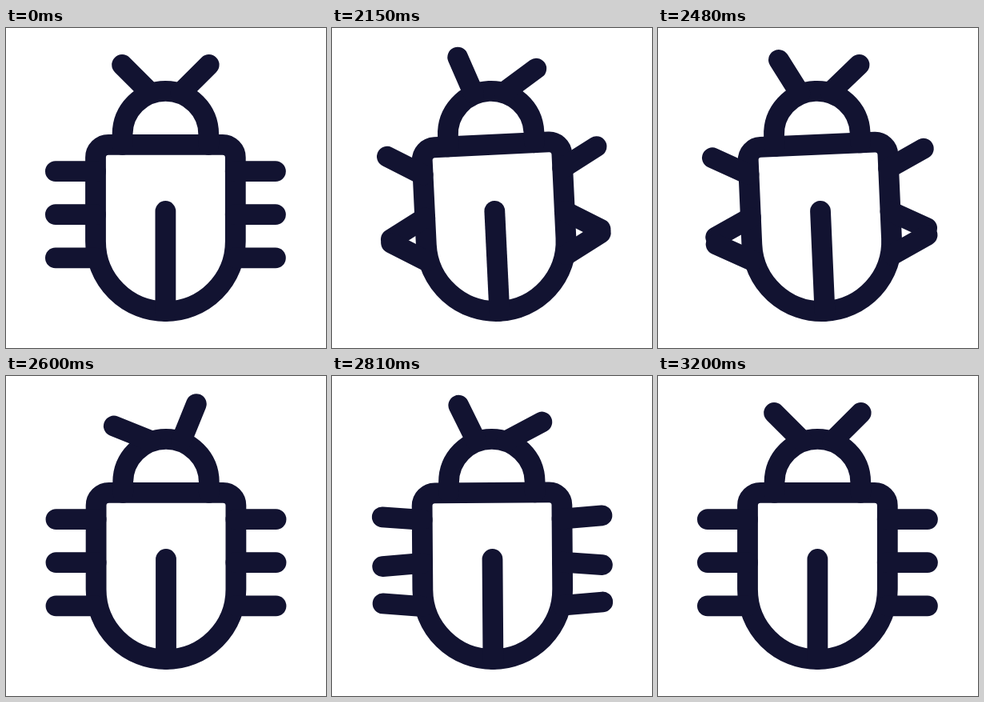
An HTML page that plays this animation: 400 by 400 pixels, repeating every 3230 ms.

```html
<!DOCTYPE html>
<html lang="en">
<head>
<meta charset="utf-8">
<title>Bug</title>
<style>
  html, body { margin: 0; width: 100%; height: 100%; overflow: hidden; background: #fff; }
  svg { display: block; width: 100vw; height: 100vh; }
  path { fill: none; stroke: #121331; stroke-width: 25.8; stroke-linecap: round; stroke-linejoin: round; }
</style>
</head>
<body>
<svg viewBox="0 0 400 400">
  <g id="bug">
    <path d="M-71.4 145.8H71.4A16 16 0 0 1 87.4 161.8V266.8A87.4 87.4 0 0 1 -87.4 266.8V161.8A16 16 0 0 1 -71.4 145.8Z"/>
    <path d="M-53.8 145.8V132.6A53.8 53.8 0 0 1 53.8 132.6V145.8"/>
    <path d="M0 229V354"/>
  </g>
</svg>
<script>
const LOOP = 3230, START = 2030, STEP = 30, STEPS = 40;
const bug = document.getElementById('bug');

function limb(side, x1, y1, x2, y2) {
  const el = document.createElementNS('http://www.w3.org/2000/svg', 'path');
  el.setAttribute('d', `M${side * x1} ${y1}L${side * x2} ${y2}`);
  bug.append(el);
  return { side, turn: a => el.setAttribute('transform', `rotate(${a} ${side * x1} ${y1})`) };
}

const sides = [-1, 1];
const antennae = sides.map(s => limb(s, 19.2, 81, 54.3, 46));
const legs = [179.2, 233.2, 287.4].flatMap((y, row) =>
  sides.map(s => ({ ...limb(s, 87.4, y, 137.5, y), dir: row === 1 ? -1 : 1 })));

// Keys: [step, angle, optional starting slope]
const gait = [[0, 0, 0.75], [4.75, -30], [9.75, 30], [15, -30], [20, 0]];
const sway = [[0, 0, 0.75], [4.75, 18], [9.75, -18], [14.6, 16], [20, -23],
              [26, 21.5], [31.5, -16], [37, 0], [40, 0]];

function track(keys, n) {
  const i = Math.max(1, keys.findIndex(k => k[0] >= n));
  const [t0, v0, k = 0] = keys[i - 1], [t1, v1] = keys[i];
  const t = (n - t0) / (t1 - t0);
  return v0 + (v1 - v0) * t * (k + (3 - 2 * k) * t + (k - 2) * t * t);
}

function draw(ms) {
  const n = ms < START ? 0 : Math.min(STEPS, Math.floor((ms - START) / STEP) + 1);
  const swing = track(gait, n % 20), tilt = track(sway, n);
  const cx = n % STEPS ? 200 : 199.4;
  bug.setAttribute('transform', `translate(${cx} 0) rotate(${swing * 0.093} 0 160)`);
  legs.forEach(l => l.turn(l.side * l.dir * swing));
  antennae.forEach(a => a.turn(tilt + a.side * swing * 0.22));
}

const t0 = performance.now();
function tick() {
  draw((performance.now() - t0) % LOOP);
  requestAnimationFrame(tick);
}
draw(0);
requestAnimationFrame(tick);
</script>
</body>
</html>
```
